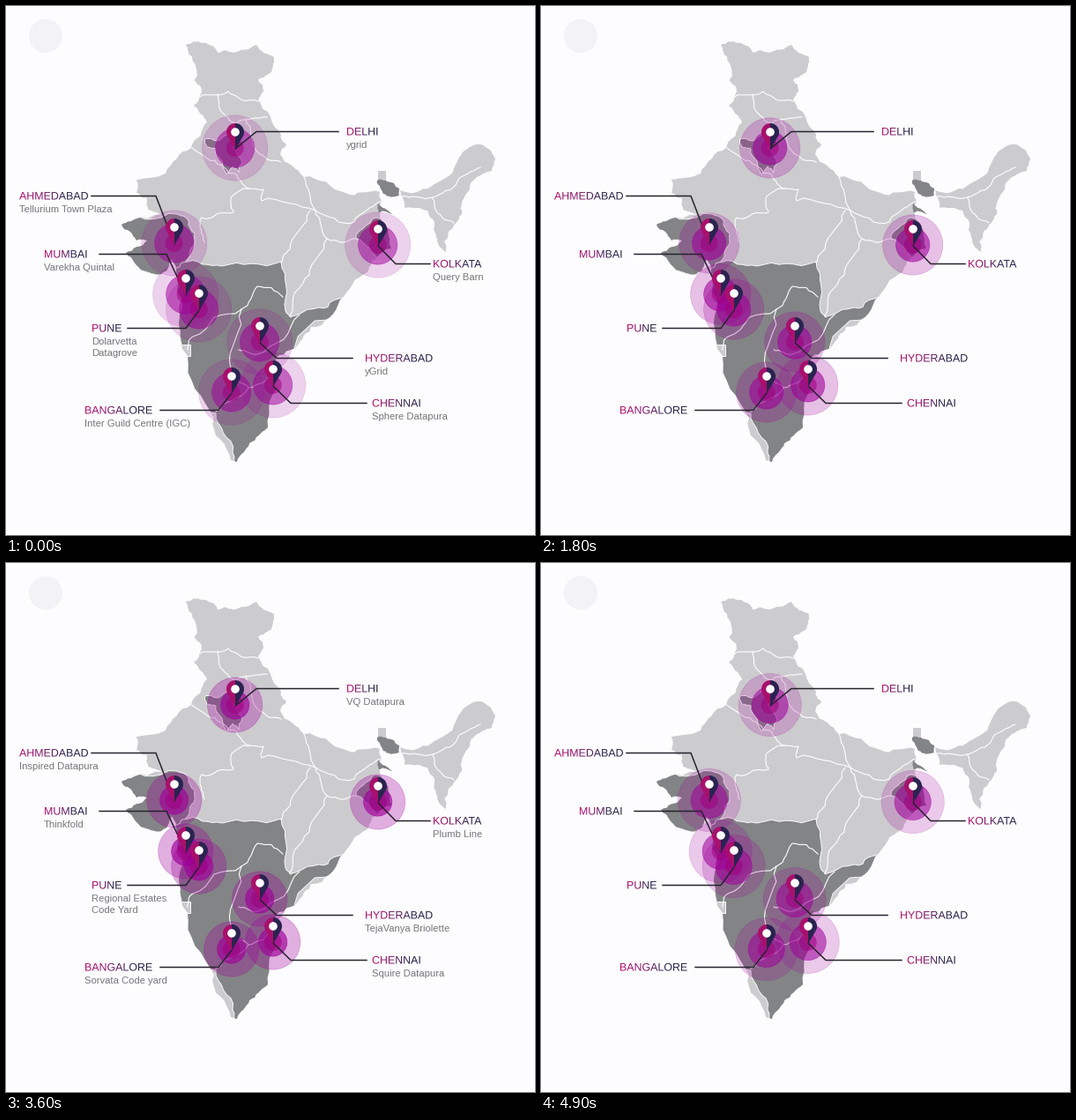
These frames come from a looping animation (600x600 px, 5 s). A matplotlib script:

```python
import math
import random

import matplotlib.pyplot as plt
import numpy as np
from matplotlib.animation import FuncAnimation
from matplotlib.colors import LinearSegmentedColormap
from matplotlib.patches import Circle, Polygon, Rectangle
from matplotlib.textpath import TextPath
from matplotlib.transforms import Affine2D

SIZE, DPI = 600, 100
FRAMES, INTERVAL = 50, 100
PX = 72 / DPI
PAPER, LIGHT, DARK = "#fdfcfe", "#cccbce", "#838486"
INK, GREY, PULSE = "#26232d", "#77777c", "#a0009b"
FONT = "Liberation Sans"
WORD_MAP = LinearSegmentedColormap.from_list(
    "word", ["#b3126f", "#8a1a6b", "#2f2850", "#232040"])

# Mainland outline, clockwise
NORTH = [(204, 44), (222, 42), (240, 53), (258, 53), (284, 44), (304, 58), (300, 76),
         (286, 84), (292, 97), (286, 106), (312, 146), (318, 158), (311, 168),
         (338, 194), (385, 212), (424, 211)]
EAST = [(424, 234), (437, 275), (415, 289), (410, 302), (379, 333), (346, 364),
        (337, 377), (306, 399), (304, 420), (297, 478), (276, 496), (262, 517),
        (255, 515)]
WEST = [(236, 467), (206, 396), (196, 360), (188, 287), (183, 299), (169, 304),
        (145, 290), (136, 280), (160, 266), (148, 266), (131, 248), (142, 244),
        (178, 237), (161, 231), (160, 217), (148, 212), (148, 197), (181, 190),
        (210, 161), (228, 132), (213, 113), (222, 97), (214, 85), (216, 72)]
NORTHEAST = [(447, 209), (482, 205), (510, 180), (533, 157), (555, 173), (551, 187),
             (530, 198), (517, 223), (510, 247), (502, 256), (499, 279), (488, 262),
             (478, 232), (452, 229)]

# Dark states run past the coast and are clipped to the mainland
GUJARAT = [(120, 240), (194, 236), (214, 258), (208, 284), (188, 310), (120, 310)]
SOUTH = [(185, 304), (200, 291), (245, 295), (312, 290), (317, 346), (323, 353),
         (346, 344), (381, 331), (395, 335), (325, 400), (325, 480), (257, 525),
         (257, 506), (238, 462), (180, 400)]
HARYANA = [(226, 151), (240, 153), (257, 140), (268, 178), (264, 189), (257, 182),
           (250, 191), (238, 162), (228, 160)]
BENGAL = [(421, 240), (450, 280), (426, 290), (397, 264), (400, 256)]
HILLS = [(421, 198), (431, 198), (446, 207), (446, 215), (428, 213)]
DELTA = [(422, 223), (438, 236), (423, 234)]

NORTH_BORDERS = [
    [(214, 104), (252, 97), (286, 108)],
    [(240, 100), (243, 118), (262, 133), (296, 126)],
    [(272, 128), (285, 165), (312, 177)],
    [(211, 161), (245, 181), (262, 192), (276, 207), (255, 218), (258, 234),
     (222, 240), (225, 268)],
    [(276, 207), (292, 208), (290, 221), (351, 232)],
    [(338, 194), (351, 232), (395, 245), (424, 222)],
]
SOUTH_BORDERS = [
    [(345, 232), (322, 276), (312, 291)],
    [(351, 233), (364, 264), (398, 264)],
    [(364, 264), (344, 305), (322, 352)],
    [(206, 390), (212, 375), (267, 344), (285, 318), (314, 330)],
    [(267, 344), (255, 411), (275, 433)],
    [(264, 390), (285, 395), (333, 350)],
    [(238, 460), (275, 433), (304, 414)],
    [(449, 216), (484, 217), (512, 199), (538, 183)],
    [(484, 217), (488, 232), (508, 246)],
]

# name, left edge, heading middle, pin head, leader start and bend, two texts
SITES = [
    ("DELHI", 386, 142, 260, 143, 377, 284, "ygrid", "VQ Datapura"),
    ("AHMEDABAD", 15, 215, 191, 251, 97, 170,
     "Tellurium Town Plaza", "Inspired Datapura"),
    ("MUMBAI", 43, 281, 204, 309, 106, 182, "Varekha Quintal", "Thinkfold"),
    ("PUNE", 97, 365, 219, 326, 138, 204,
     "Dolarvetta\nDatagrove", "Regional Estates\nCode Yard"),
    ("HYDERABAD", 407, 399, 288, 363, 393, 307, "yGrid", "TejaVanya Briolette"),
    ("BANGALORE", 89, 458, 256, 420, 175, 241,
     "Inter Guild Centre (IGC)", "Sorvata Code yard"),
    ("CHENNAI", 415, 450, 303, 412, 409, 323, "Sphere Datapura", "Squire Datapura"),
    ("KOLKATA", 484, 292, 422, 253, 481, 442, "Query Barn", "Plumb Line"),
]

fig = plt.figure(figsize=(SIZE / DPI, SIZE / DPI), dpi=DPI, facecolor=PAPER)
ax = fig.add_axes([0, 0, 1, 1])


def rough(points, closed=True, depth=3):
    """Subdivide a line with small sideways shifts for a map-like edge."""
    rng = random.Random(len(points))
    pts = points + points[:1] if closed else list(points)
    for _ in range(depth):
        out = [pts[0]]
        for (x0, y0), (x1, y1) in zip(pts, pts[1:]):
            k = max(-0.15, min(0.15, rng.gauss(0, 0.1)))
            out += [((x0 + x1) / 2 - k * (y1 - y0), (y0 + y1) / 2 + k * (x1 - x0)),
                    (x1, y1)]
        pts = out
    return pts


def land(points, color, edge="none", clip=None):
    shape = ax.add_patch(Polygon(rough(points), fc=color, ec=edge, lw=0.9 * PX, zorder=1))
    if clip is not None:
        shape.set_clip_path(clip)
    return shape


def draw_map():
    mainland = land(NORTH + EAST + WEST, LIGHT)
    land(NORTHEAST, LIGHT)
    ax.add_patch(Rectangle((422, 187), 9, 12, fc=LIGHT, ec="none"))
    for state in (GUJARAT, SOUTH, HARYANA, BENGAL):
        land(state, DARK, "white", mainland)
    for state in (HILLS, DELTA):
        land(state, DARK)
    goa = ax.add_patch(Rectangle((199, 384), 10, 13, fc=LIGHT, ec="white", lw=0.9 * PX))
    goa.set_clip_path(mainland)
    for border in NORTH_BORDERS + SOUTH_BORDERS:
        ax.plot(*zip(*rough(border, closed=False)), color="white", lw=1.1 * PX, zorder=2)


def draw_pin(x, y):
    phi = np.radians(np.linspace(0, 118, 30))
    side_x = np.append(10 * np.sin(phi), 0)
    side_y = np.append(-10 * np.cos(phi), 20)
    for sign, color in ((-1, "#a8106c"), (1, "#2a2350")):
        ax.add_patch(Polygon(np.column_stack([x + sign * side_x, y + side_y]),
                             fc=color, ec="none", zorder=6))
    ax.add_patch(Circle((x, y), 4.8, fc="white", ec="none", zorder=7))


def draw_heading(word, x, middle):
    flip = Affine2D().scale(1, -1).translate(x, middle + 4.5)
    path = TextPath((0, 0), word, size=12.4, prop={"family": FONT}).transformed(flip)
    box = path.get_extents()
    ramp = ax.imshow(np.linspace(0, 1, 128)[None, :], cmap=WORD_MAP, aspect="auto",
                     extent=(box.x0 - 1, box.x1 + 1, box.y1 + 1, box.y0 - 1), zorder=8)
    ramp.set_clip_path(path, ax.transData)


def make_lines(x, middle, text):
    """Text lines that vanish above the lower edge of their heading."""
    window = Rectangle((0, SIZE), SIZE, middle + 5 - SIZE, transform=ax.transData)
    lines = text.split("\n")
    travel = 8 + 8 * len(lines)
    made = []
    for i, line in enumerate(lines):
        y = middle + 19 + 13 * i
        label = ax.text(x, y, line, family=FONT, fontsize=11.3 * PX, color=GREY,
                        va="baseline", clip_on=True, zorder=5)
        label.set_clip_path(window)
        made.append((label, y, travel))
    return made


def make_rings(x, y):
    ax.add_patch(Circle((x, y), 10, fc="#a0007d", ec="none", alpha=0.55, zorder=3.5))
    return [ax.add_patch(Circle((x, y), 8, fc=PULSE, ec=PULSE, lw=0.7 * PX, zorder=3))
            for _ in range(3)]


def progress(t, start, length):
    return min(1, max(0, (t - start) / length))


def place(labels, shift, alpha):
    for label, y, travel in labels:
        label.set_y(y + shift * travel)
        label.set_alpha(alpha)
        label.set_visible(alpha > 0)


ax.add_patch(Circle((45, 34), 19, fc="#f3f2f4", ec="none"))
draw_map()
rings, first, second = [], [], []
for name, x, middle, pin_x, pin_y, start, bend, text_a, text_b in SITES:
    rings.append(make_rings(pin_x - 0.3, pin_y + 18))
    level = middle + 0.5
    ax.plot([start, bend, pin_x], [level, level, pin_y + 19],
            color=INK, lw=1.5 * PX, zorder=4)
    draw_pin(pin_x, pin_y)
    draw_heading(name, x, middle)
    first += make_lines(x, middle, text_a)
    second += make_lines(x, middle, text_b)
ax.set(xlim=(0, SIZE), ylim=(SIZE, 0))
ax.axis("off")


def update(frame):
    t = frame * INTERVAL
    phase = math.fmod(t / 1000 + 0.94, 1)
    for group in rings:
        for k, ring in enumerate(group):
            age = phase + k
            ring.set_radius(min(8 + 15 * age, 37.5))
            ring.set_alpha(max(0, 0.85 * (1 - age / 2.4)))

    leave = progress(t, 1000, 600) ** 2
    place(first, -leave, 1 - leave)

    wait = (1 - progress(t, 2250, 800)) ** 2
    leave = progress(t, 4060, 600) ** 2
    place(second, wait - leave, 1 - wait - leave)
    return []


animation = FuncAnimation(fig, update, frames=FRAMES, interval=INTERVAL,
                          repeat=True, repeat_delay=0, blit=False)
plt.show()
```
